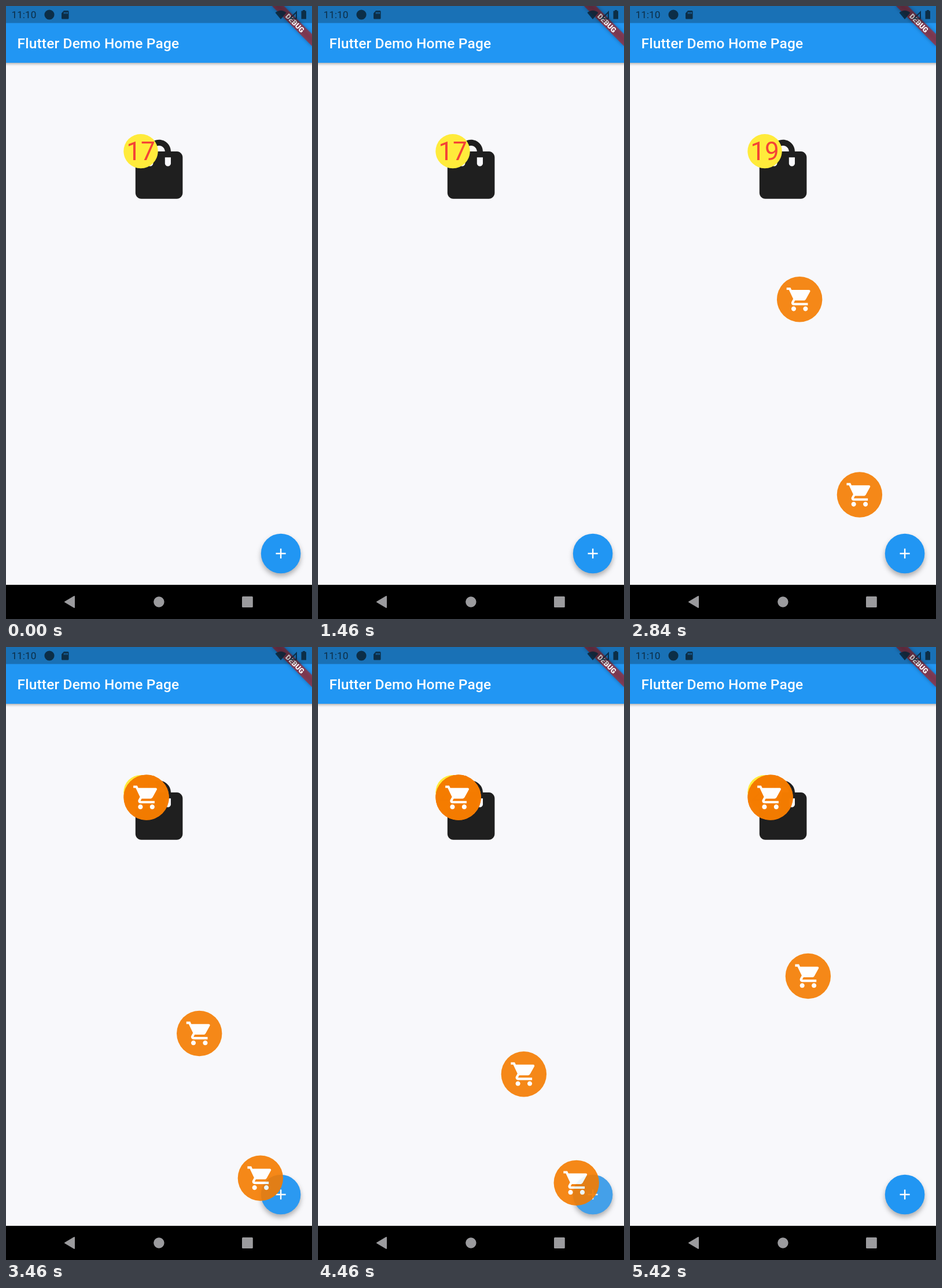
An HTML page that plays this animation: 529x1058 px, repeating every 5.46 s.

```html
<!DOCTYPE html>
<html lang="en">
<head>
<meta charset="utf-8">
<title>Cart animation</title>
<style>
  html, body { margin: 0; width: 100%; height: 100%; overflow: hidden; background: #f8f8fb; }
  svg { display: block; width: 100%; height: 100%; }
  text { font-family: Roboto, sans-serif; }
  .bar { filter: drop-shadow(0 2px 2px rgba(0,0,0,.3)); }
  .fab { filter: drop-shadow(0 5px 4px rgba(0,0,0,.3)); }
  .banner { filter: drop-shadow(0 0 3px rgba(0,0,0,.5)); }
</style>
</head>
<body>
<svg viewBox="0 0 529 1058">
  <defs>
    <g id="cart">
      <circle r="39.2" fill="#f57c00"/>
      <path transform="scale(2.041) translate(-12 -12)" fill="#fff" d="M7 18c-1.1 0-1.99.9-1.99 2S5.9 22 7 22s2-.9 2-2-.9-2-2-2zM1 2v2h2l3.6 7.59-1.35 2.45c-.16.28-.25.61-.25.96 0 1.1.9 2 2 2h12v-2H7.42c-.14 0-.25-.11-.25-.25l.03-.12.9-1.63h7.45c.75 0 1.41-.41 1.75-1.03l3.58-6.49c.08-.14.12-.31.12-.48 0-.55-.45-1-1-1H5.21l-.94-2H1zm16 16c-1.1 0-1.99.9-1.99 2s.89 2 1.99 2 2-.9 2-2-.9-2-2-2z"/>
    </g>
  </defs>
  <rect width="529" height="1058" fill="#f8f8fb"/>

  <!-- app bar -->
  <rect class="bar" x="-10" y="-10" width="549" height="108" fill="#2196f3"/>
  <text x="19.6" y="73" font-size="24.5" font-weight="500" letter-spacing=".18" fill="#fff">Flutter Demo Home Page</text>

  <!-- bag and badge -->
  <path transform="translate(203.4 220.5) scale(5.1)" fill="#1f1f1f" d="M18 6h-2c0-2.21-1.79-4-4-4S8 3.79 8 6H6c-1.1 0-2 .9-2 2v12c0 1.1.9 2 2 2h12c1.1 0 2-.9 2-2V8c0-1.1-.9-2-2-2zm-8 4c0 .55-.45 1-1 1s-1-.45-1-1V8h2v2zm2-6c1.1 0 2 .9 2 2h-4c0-1.1.9-2 2-2zm4 6c0 .55-.45 1-1 1s-1-.45-1-1V8h2v2z"/>
  <circle cx="233" cy="250.6" r="29.7" fill="#ffeb3b"/>
  <text id="count" x="233" y="265.5" font-size="44.1" text-anchor="middle" fill="#f44336">17</text>

  <!-- add button -->
  <circle class="fab" cx="475.1" cy="945" r="34.3" fill="#2196f3"/>
  <path transform="translate(460.4 930.3) scale(1.2245)" fill="#fff" d="M19 13h-6v6h-2v-6H5v-2h6V5h2v6h6z"/>
  <circle id="splash" cx="475.1" cy="945" r="34.3" fill="#c4c4c4" opacity="0"/>

  <g id="carts"></g>

  <!-- corner banner -->
  <g transform="translate(529 0) rotate(45)">
    <rect class="banner" x="-49" y="34.3" width="98" height="14.7" fill="#b71c1c" fill-opacity=".63"/>
    <text y="46.1" font-size="12.5" font-weight="900" text-anchor="middle" fill="#fff">DEBUG</text>
  </g>

  <!-- status bar -->
  <rect width="529" height="29.4" fill="#000" opacity=".25"/>
  <g fill="#0a2438" fill-opacity=".88">
    <text x="9.5" y="21" font-size="17.2">11:10</text>
    <circle cx="75" cy="15" r="8.6"/>
    <path d="M100 8h7q1.500 0 1.500 1.500v11.500q0 1.500-1.500 1.500h-9.500q-1.500 0-1.500-1.500v-8.500zM100 10.500v3h1.500v-3zm2.700 0v3h1.500v-3zm2.600 0v3h1.500v-3z" fill-rule="evenodd"/>
    <path d="M465.500 11.500q9.500-7.500 19 0l-9.500 11.500z"/>
    <path d="M503 8v14.500h-14.500zM501 13l-7.500 7.500h7.500z" fill-rule="evenodd"/>
    <path d="M513 7h4v1.500h2v14h-8.500v-14h2.500z"/>
  </g>

  <!-- navigation bar -->
  <rect y="999" width="529" height="59"/>
  <g fill="#9b9b9e">
    <path d="M102 1028.500l16-9.500v19z" stroke="#9b9b9e" stroke-width="2" stroke-linejoin="round"/>
    <circle cx="264.400" cy="1028.500" r="9.200"/>
    <rect x="408" y="1019" width="18.800" height="19" rx="1.500"/>
  </g>
</svg>
<script>
const LOOP = 5460, LIFE = 2000;
// tap time and flight time of each cart, ms
const taps = [[2054, 1000], [2512, 940], [2847, 1000], [3292, 1000],
              [3938, 1000], [4321, 1000], [4696, 1000]];
const start = [480, 949.9], end = [242.6, 259.6], bend = [361.3, 902];

const byId = id => document.getElementById(id);
const clamp = v => Math.max(0, Math.min(1, v));
const bezier = (p, i) =>
  (1 - p) ** 2 * start[i] + 2 * p * (1 - p) * bend[i] + p * p * end[i];

const carts = taps.map(() => {
  const use = document.createElementNS("http://www.w3.org/2000/svg", "use");
  use.setAttribute("href", "#cart");
  use.setAttribute("opacity", .9);
  return byId("carts").appendChild(use);
});

function draw(now) {
  const t = now % LOOP;
  let count = 17, splash = 0;
  taps.forEach(([tap, flight], i) => {
    const age = t - tap, p = clamp(age / flight);
    carts[i].style.display = age >= 0 && age < LIFE ? "" : "none";
    carts[i].setAttribute("transform", `translate(${bezier(p, 0)} ${bezier(p, 1)})`);
    if (age >= 0) count++;
    splash = Math.max(splash, .38 * clamp(Math.min(age / 75, (180 - age) / 70)));
  });
  byId("count").textContent = count;
  byId("splash").setAttribute("opacity", splash);
}

const t0 = performance.now();
function tick() {
  draw(performance.now() - t0);
  requestAnimationFrame(tick);
}
tick();
</script>
</body>
</html>
```
